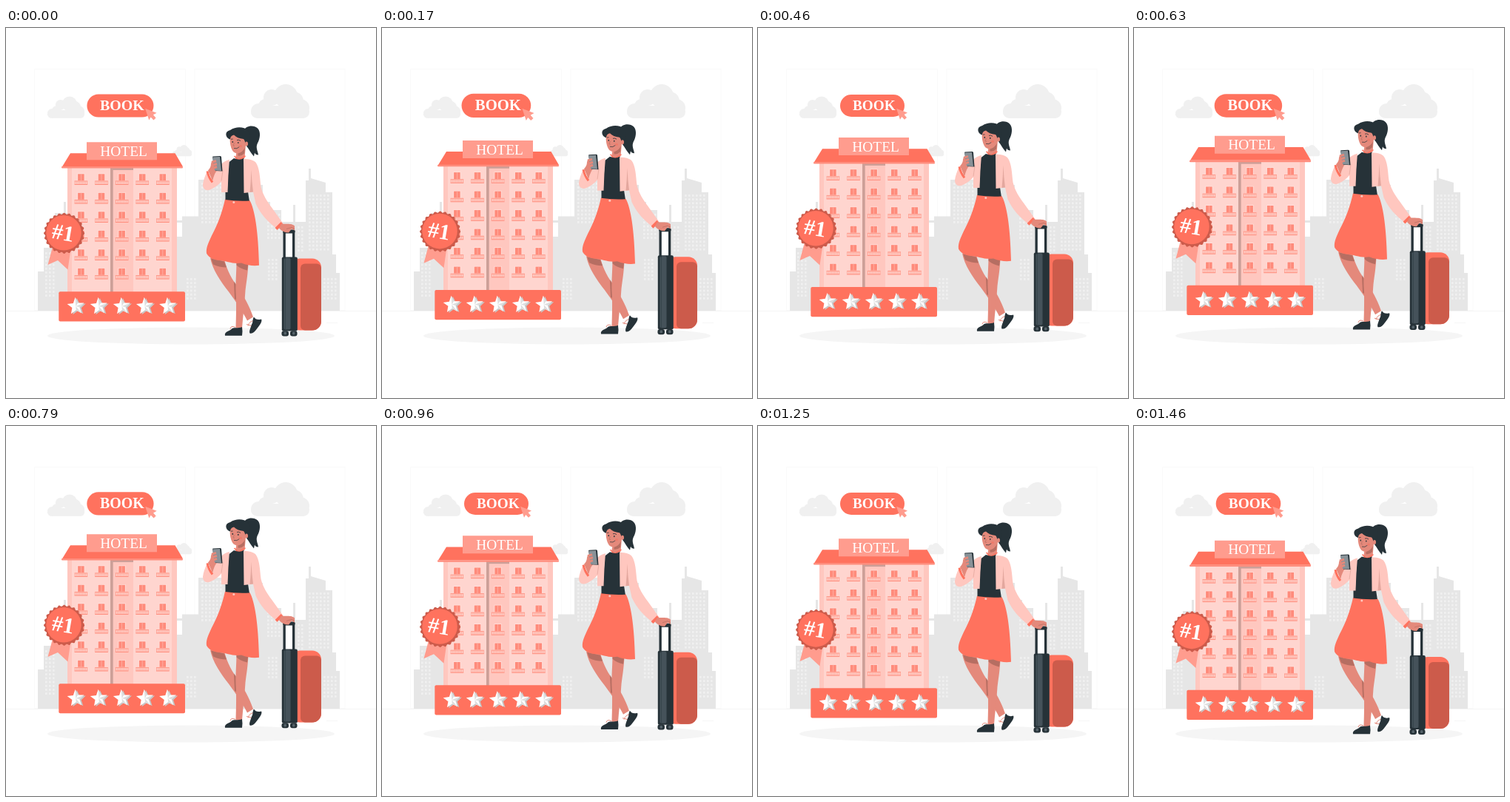
An HTML page with a canvas for the animation above (1.5 s loop, 500 by 500 pixels).

```html
<!DOCTYPE html>
<html lang="en">
<head>
<meta charset="utf-8">
<title>Hotel booking</title>
<style>
html, body { margin: 0; width: 100%; height: 100%; overflow: hidden; background: #fff; }
canvas { display: block; width: 500px; height: 500px; }
</style>
</head>
<body>
<canvas id="stage" width="500" height="500"></canvas>
<script>
const ctx = document.getElementById('stage').getContext('2d');
const LOOP = 1500, STEPS = 36, PHASE = 1.25;
const CORAL = '#ff725e', LIGHT = '#ff9c8e', DEEP = '#cc5b4b', INK = '#263238';
const PINK = '#ffc7bf', PALE = '#ffd5cf', FOLD = '#e3a79e';
const SKIN = '#e4897b', SKIN_SHADE = '#b66e62';

function fill(color, d) {
  ctx.fillStyle = color;
  ctx.fill(new Path2D(d));
}
function line(color, width, d) {
  ctx.strokeStyle = color;
  ctx.lineWidth = width;
  ctx.stroke(new Path2D(d));
}
function box(color, x, y, w, h, r = 0) {
  ctx.fillStyle = color;
  ctx.beginPath();
  ctx.roundRect(x, y, w, h, r);
  ctx.fill();
}
function oval(color, x, y, rx, ry = rx) {
  ctx.fillStyle = color;
  ctx.beginPath();
  ctx.ellipse(x, y, rx, ry, 0, 0, Math.PI * 2);
  ctx.fill();
}
function text(label, font, x, y) {
  ctx.font = font + ' "Liberation Serif", serif';
  ctx.fillStyle = '#fff';
  ctx.fillText(label, x, y);
}
function at(x, y, draw, scale = 1, angle = 0) {
  ctx.save();
  ctx.translate(x, y);
  ctx.rotate(angle);
  ctx.scale(scale, scale);
  draw();
  ctx.restore();
}

function cloud(x, y, scale) {
  const puffs = [[10, 36, 10], [19, 29, 9], [28, 18, 11], [47, 16, 16], [58, 23, 13], [67, 32, 12]];
  at(x, y, () => {
    box('#f0f0f0', 0, 29, 79, 17, 8.5);
    for (const [px, py, r] of puffs) oval('#f0f0f0', px, py, r);
  }, scale);
}

function backdrop() {
  ctx.fillStyle = '#fff';
  ctx.fillRect(0, 0, 500, 500);
  ctx.strokeStyle = '#fafafa';
  ctx.lineWidth = 1;
  ctx.strokeRect(38.5, 55.5, 204, 326);
  ctx.strokeRect(255, 55.5, 203, 326);
  box('#f0f0f0', 0, 382, 500, 0.7);
  box('#f3f3f3', 433, 398, 15, 0.7);
  cloud(56, 92.5, 0.635);
  cloud(331, 76, 1);
  cloud(225, 158, 0.33);
  fill('#e6e6e6', 'M43 382V329H51V297H66V250H78V235H81V250H229V260H238V254.5H260V205H296V200H343V212H347V235H357V246H372V262H388V239H391V262H405V206H409V190H412V203L432 209V222H441V306H446V331H451V382Z');
  box('#fff', 229, 263, 9, 19);
  const windows = [[264, 209, 6, 11], [409, 225, 6, 15], [53, 303, 3, 12], [244, 338, 3, 6],
    [353, 251, 4, 7], [354, 312, 3, 6], [394, 268, 2, 7], [429, 338, 4, 6]];
  for (const [x, y, cols, rows] of windows)
    for (let i = 0; i < cols * rows; i++)
      box('#f0f0f0', x + i % cols * 5, y + Math.floor(i / cols) * 5.2, 2.6, 2.8);
  oval('#f5f5f5', 250, 416, 194, 11.5);
}

function hotelWindow(x, y) {
  box('#ffe3df', x - 5, y - 0.7, 10, 9.7);
  box('#ff8b7b', x - 4.3, y, 8.6, 9);
  box('#ffb3a8', x - 0.4, y, 0.8, 9);
  box('#ffdcd7', x - 8.6, y + 9.5, 17.2, 5);
  box('#ff9484', x - 8.8, y + 9.2, 17.6, 0.9);
  box('#ff8b7b', x - 8.8, y + 13.7, 17.6, 1);
  for (let i = 0; i < 9; i++) box('#ff9484', x - 8.6 + i * 2.06, y + 9.5, 0.8, 5);
}

const STAR = Array.from({ length: 10 }, (_, i) => {
  const angle = i * Math.PI / 5 - Math.PI / 2 - 0.07, r = i % 2 ? 5.3 : 12;
  return r * Math.cos(angle) + ' ' + r * Math.sin(angle);
});

function star() {
  const outline = 'M' + STAR.join('L') + 'Z';
  at(2.3, 1, () => fill('#c7c7c7', outline));
  fill('#fff', outline);
  for (const i of [0, 2, 4]) fill('#dedede', `M0 0L${STAR[i]}L${STAR[i + 1]}Z`);
}

function badge() {
  fill(LIGHT, 'M63 296L56.5 320.5L70 314.5L83.5 327L88 296Z');
  ctx.fillStyle = DEEP;
  ctx.beginPath();
  for (let i = 0; i <= 240; i++) {
    const a = i * Math.PI / 120, r = 26.6 + Math.cos(a * 24);
    ctx.lineTo(78.6 + r * Math.cos(a), 277.8 + r * Math.sin(a));
  }
  ctx.fill();
  oval(CORAL, 78, 277.3, 23.8);
  at(77, 277, () => text('#1', 'bold 30px', -14.8, 10), 1, 0.17);
}

function hotel() {
  box(PINK, 83, 189, 148, 169);
  box(PALE, 89, 189, 52, 169);
  box(PALE, 172, 189, 52, 169);
  box('#cc9f98', 141, 189, 3.7, 169);
  box('#cc9f98', 141, 189, 31, 3.5);
  for (let row = 0; row < 6; row++)
    for (let col = 0; col < 5; col++) hotelWindow(101.4 + col * 27.6, 197.8 + row * 25.5);
  fill(CORAL, 'M87 169.8H228.5L239 187.7H76Z');
  box('#ff8d7d', 75, 187.5, 164, 2.5, 1);
  box(LIGHT, 109, 154.7, 95, 24);
  text('HOTEL', '19.4px', 127.3, 173.3);
  badge();
  box(CORAL, 71.3, 356.7, 170.7, 40.2, 2);
  for (let i = 0; i < 5; i++) at(94.3 + i * 31.1, 376.5, star);
}

function suitcase() {
  box('#fff', 378, 277, 9.5, 34);
  box(CORAL, 385, 312, 41, 97, 12);
  box(DEEP, 398, 319, 28, 90, [6, 6, 12, 6]);
  box(INK, 372.8, 310, 21, 100, 2);
  box('#45525a', 375.5, 311, 9, 97, 2);
  box('#36444b', 377, 311, 1, 97);
  box(INK, 374.5, 274, 3.3, 38);
  box(INK, 387, 274, 3.3, 38);
  box(INK, 374.3, 273, 16.2, 5, 2);
  box(INK, 372.5, 409.7, 9.5, 7.2, 3);
  box(INK, 384, 409.7, 9.5, 7.2, 3);
  box('#56636a', 375.5, 411, 3.5, 4, 1.5);
  box('#56636a', 387, 411, 3.5, 4, 1.5);
}

function legs() {
  fill(SKIN, 'M276 311C279 327 290 343 301 357C310 369 320 384 326 396L334 391C329 376 321 362 313 351C306 340 299 330 295 313Z');
  fill(SKIN_SHADE, 'M277 312L295 316L298 324Q288 324 280 320Z');
  fill(SKIN_SHADE, 'M308 343L313 350V370L309 366Z');
  line(SKIN, 1, 'M327 403Q329 396 336 396M325 401L332 403');
  fill(INK, 'M329.5 413C328 410 331 405 332 401C334 399 333 393 335 391Q338 396 345 394C347 397 342 403 339 407C336 411 333 414 329.5 413Z');
  fill(SKIN, 'M311.5 315L327.5 317C327 332 325 343 323.5 355C322.5 374 320 391 319 406H310.5C311 390 311.5 372 310.5 358C310 344 311.5 331 311.5 315Z');
  fill(SKIN_SHADE, 'M311.5 316L327.5 318L326 328Q317 326 311.5 321Z');
  line(SKIN, 1, 'M303 407Q304 402 310 405');
  fill(INK, 'M296 416.3C295 411 300 411 304 408C307 404 314 407 319 404.5Q320 411 319 416.3Z');
}

function head() {
  fill(INK, 'M321 140C323 132 335 131 340 136C345 141 343 151 340 156C337 162 340 166 341 172Q337 172 336 169L335 174C331 170 329 165 325 160Z');
  fill(SKIN, 'M312 164L324 158L322.5 176Q317 182 310 178Z');
  fill(SKIN_SHADE, 'M313.5 170Q320 168 323 162L322 170Q318 174 313.5 173Z');
  fill(SKIN, 'M303 145C302 153 303 161 306 166C309 171 315 171 320 166L327 154L323 141L309 139Z');
  fill(INK, 'M303 151C296 149 295 140 303 138.5C311 133 322 134 327 139C331 146 329 154 326 159.5C323 159 324 154 321 150.5C315 150 311 148 308 145Q303 146 303 151Z');
  oval(SKIN, 325, 157, 2, 3);
  oval(INK, 306.3, 154.5, 0.8, 1.1);
  oval(INK, 313.8, 155.5, 0.8, 1.1);
  line(INK, 0.8, 'M304 150.8L306.5 150.5M312 152Q315 151 317 153');
  line(SKIN_SHADE, 0.7, 'M308.5 155.5L307 159.5L309 160');
  line(INK, 0.7, 'M308 163Q312 164.5 315.5 161');
  oval('#ee7b6b', 317, 160, 2, 1.6);
  line(CORAL, 1.5, 'M308.5 173.5L314 179L323.5 173.5');
}

function torso() {
  fill(INK, 'M301 182L308 176.5Q316 180 321 176.5L325 182L327 222L329 235H296.5V222L299 218Z');
  fill(PINK, 'M302 178.5C294 179.5 288 187 282 196L276 206L272 194Q267 204 266 212C266 219 271 221 276 219Q285 215 291 208L291 222.5H299.5L300.5 198Z');
  line(FOLD, 0.8, 'M291 207L293 193');
  fill(PINK, 'M321 177.5Q331 177 337 181.5C343 189 343 203 344.5 215C347 226 353 235 359 243L374 264L367 272.5C354 263 344 252 337.5 238L334 222L321.5 223.5Z');
  fill(FOLD, 'M331.5 192Q332 208 334 222L329.5 222.5Q331 207 331.5 192Z');
  line(CORAL, 3, 'M272 194Q274 203 279 209');
  fill(SKIN, 'M273 193Q277 189 277 184Q278 179 282 179L287 182L287 191Q282 195 279 207Z');
  fill(INK, 'M279 175Q279 174 280 174L289.5 173.5Q291 173.5 291 175L292.5 194L283 193.5Z');
  fill('#899298', 'M279 175L289 174.5L291 193.5L282 193Z');
  line(SKIN, 3, 'M278 182L284 180M279 186L285 184M279 190L285 188');
}

function woman() {
  legs();
  fill(CORAL, 'M296 232Q312 235.5 329.5 233.8C336 245 341 275 342 321.3Q331 323 318 318C307 320 297 315 290 314.5C281 314.5 273 310 271 305C270 297 274 290 278 281C286 266 292 250 296 232Z');
  head();
  torso();
  fill(CORAL, 'M296 232.5Q312 235 329.5 234V240H296Z');
  oval(PINK, 307.8, 236, 1.5);
  line(CORAL, 4, 'M365 272L373 264');
  fill(SKIN, 'M372 265C379 266 386 264 390 268L390 274L386 272L382 277Q374 277 369 271Z');
  line(SKIN_SHADE, 0.7, 'M379 272L386 270L390 272');
}

function button(scale) {
  at(156, 107, () => {
    ctx.translate(-156, -107);
    box(CORAL, 111, 90, 87, 30, 15);
    text('BOOK', 'bold 19.2px', 128, 111);
    fill(LIGHT, 'M187 108.7L202 114.5L197.5 117L201 121L198 123.8L194.3 120L192 123.8Z');
  }, scale);
}

function lerpKeys(keys, p) {
  const i = keys.findIndex(([pos]) => p < pos);
  const [p0, v0] = keys[i - 1], [p1, v1] = keys[i];
  return v0 + (v1 - v0) * (p - p0) / (p1 - p0);
}
const BEAT = [[0, 1], [0.1, 1.1], [0.3, 1], [0.4, 1], [0.5, 1.1], [0.6, 1], [1.001, 1]];

function frame(now) {
  // The motion ticks at 24 steps per second.
  const step = Math.floor((now % LOOP + 5) / (LOOP / STEPS));
  const p = (step + PHASE) / STEPS % 1;
  const lift = 10 * (1 - Math.abs(1 - 2 * p));
  backdrop();
  at(0, 0.2 - lift, () => {
    hotel();
    suitcase();
    woman();
  });
  button(lerpKeys(BEAT, p));
  requestAnimationFrame(() => frame(performance.now() - start));
}
const start = performance.now();
frame(0);
</script>
</body>
</html>
```
